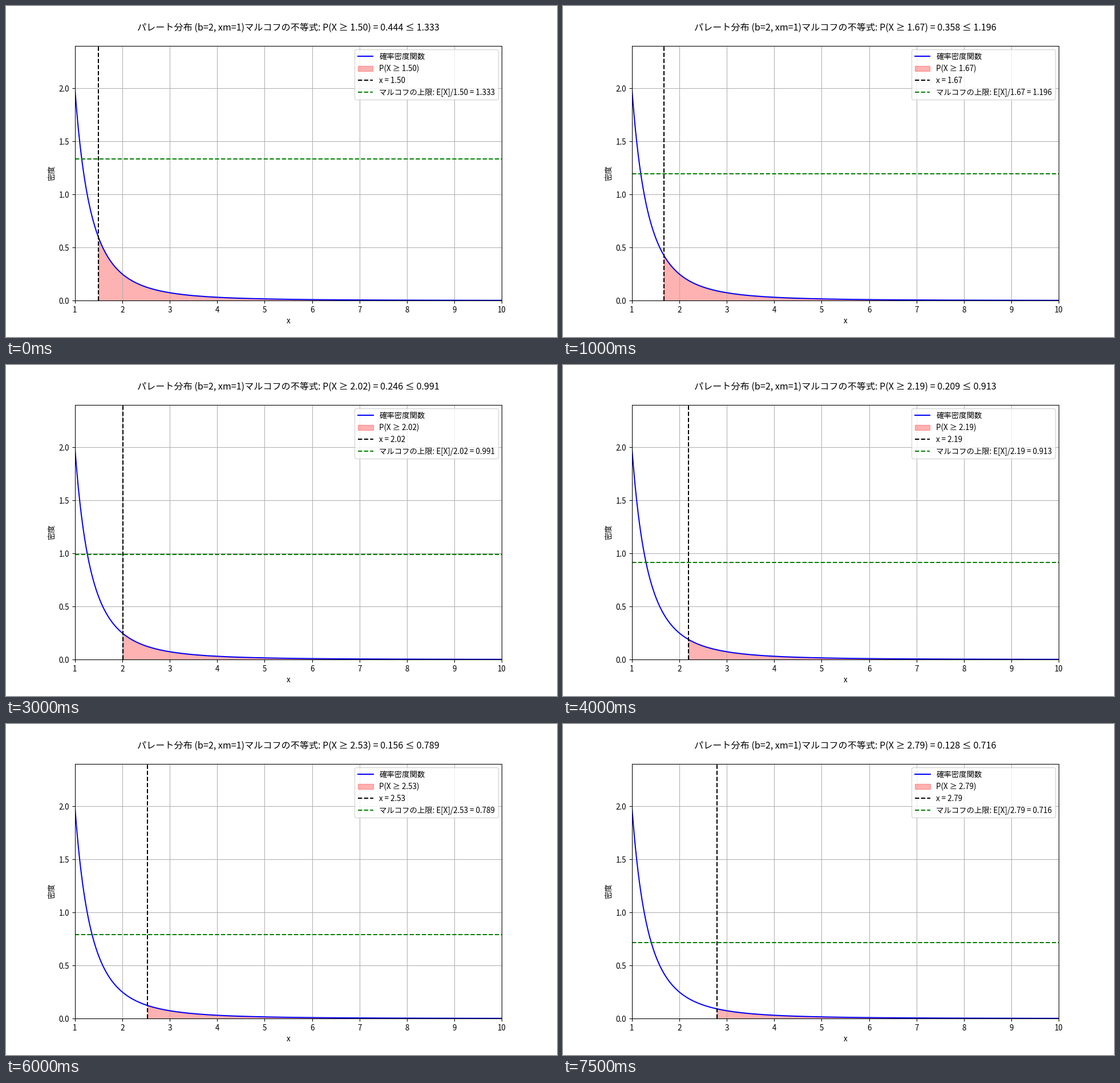
A matplotlib script that plays this animation: 966 by 580 pixels, repeating every 8 s.

```python
import numpy as np
import matplotlib.pyplot as plt
from matplotlib.animation import FuncAnimation

plt.rcParams["font.family"] = "Noto Sans CJK JP"

WIDTH, HEIGHT, DPI = 966, 580, 96.6
FRAMES, INTERVAL = 16, 500
B, XM = 2, 1
MEAN = B * XM / (B - 1)

# A hair over the pixel size so the canvas is never truncated by rounding.
fig, ax = plt.subplots(
    figsize=((WIDTH + 0.01) / DPI, (HEIGHT + 0.01) / DPI), dpi=DPI
)
x = np.linspace(XM, 10, 1000)
thresholds = np.linspace(1.5, 4, 30)


def pdf(x):
    return B * XM**B / x ** (B + 1)


def tail(t):
    return (XM / t) ** B


def update(i):
    t = thresholds[i]
    bound = MEAN / t
    ax.clear()
    ax.plot(x, pdf(x), color="blue", label="確率密度関数")
    ax.fill_between(x, pdf(x), where=x >= t, color="red", alpha=0.3,
                    label=f"P(X ≥ {t:.2f})")
    ax.axvline(t, color="black", linestyle="--", label=f"x = {t:.2f}")
    ax.axhline(bound, color="green", linestyle="--",
               label=f"マルコフの上限: E[X]/{t:.2f} = {bound:.3f}")
    ax.set_xlim(XM, 10)
    ax.set_ylim(0, 1.2 * pdf(XM))
    ax.set_xlabel("x")
    ax.set_ylabel("密度")
    ax.set_title(
        f"パレート分布 (b={B}, xm={XM})マルコフの不等式: "
        f"P(X ≥ {t:.2f}) = {tail(t):.3f} ≤ {bound:.3f}",
        pad=20,
    )
    ax.legend(loc="upper right")
    ax.grid(True)


anim = FuncAnimation(fig, update, frames=FRAMES, init_func=lambda: None,
                     interval=INTERVAL, repeat=True, repeat_delay=0)
plt.show()
```
